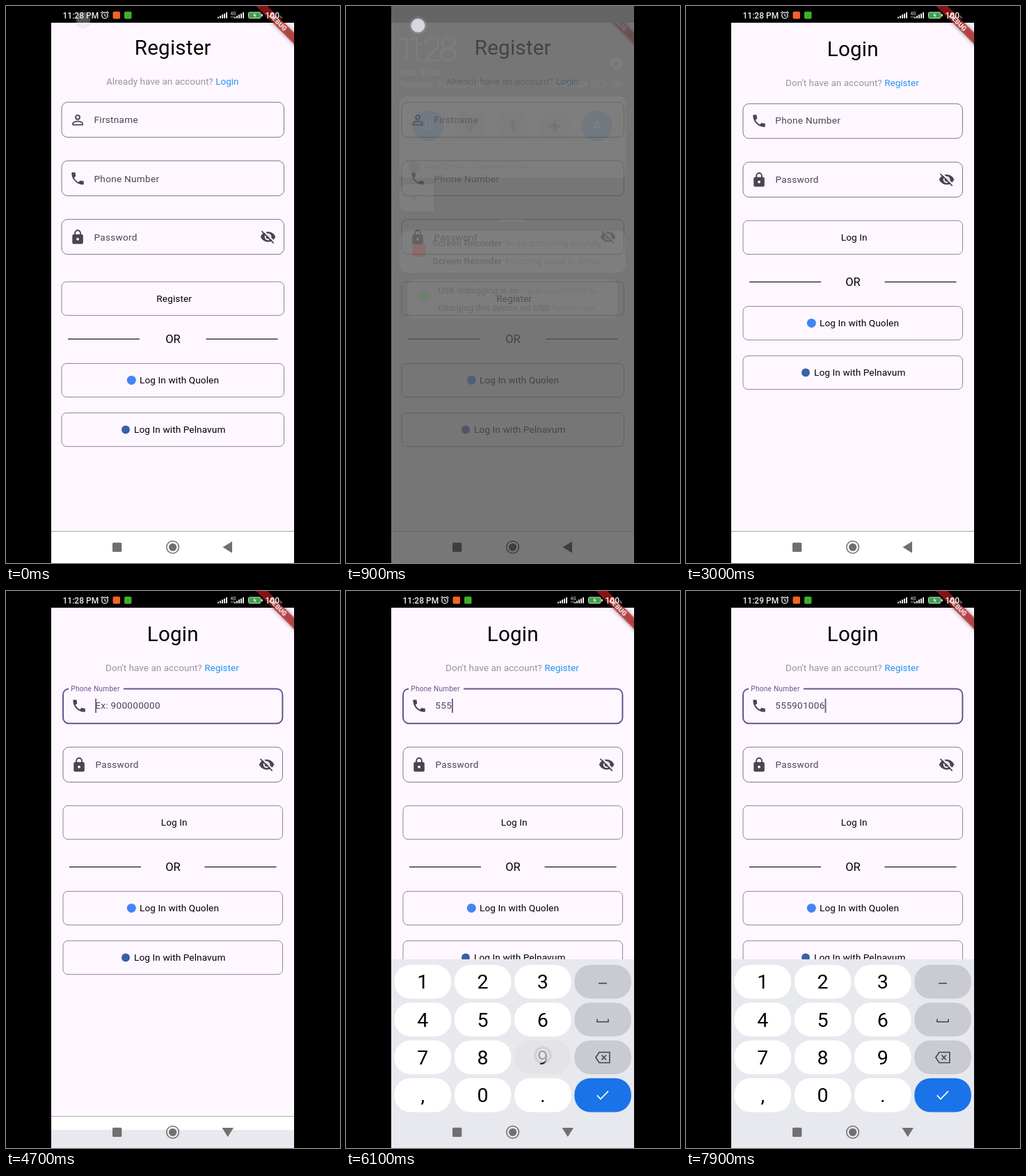
These frames come from a looping animation (480 px wide and 800 px high, 8000 ms). An HTML page:

```html
<!DOCTYPE html>
<html lang="en">
<head>
<meta charset="utf-8">
<title>Sign-in screens</title>
<style>
  html, body { margin: 0; height: 100%; overflow: hidden; background: #000; }
  svg { display: block; width: 100vw; height: 100vh; font-family: Roboto, sans-serif; }
</style>
</head>
<body>
<svg id="stage" viewBox="0 0 480 800"></svg>
<script>
const LOOP = 8000, STEP = 100;
const PAGE = '#fef7ff', INK = '#49454f', PURPLE = '#65558f';
const NUMBER = '555901006';
const PRESSES = [5300, 5500, 5800, 6100, 6400, 6900, 7200, 7500, 7700];
const HOLD = 200;

// ---------- drawing helpers ----------
const text = (x, y, size, body, more = '') =>
  `<text x="${x}" y="${y}" font-size="${size}" ${more}>${body}</text>`;
const mid = 'text-anchor="middle"';
const rect = (x, y, w, h, r, more) =>
  `<rect x="${x}" y="${y}" width="${w}" height="${h}" rx="${r}" ${more}/>`;
const circle = (x, y, r, more) => `<circle cx="${x}" cy="${y}" r="${r}" ${more}/>`;
const path = (d, more = '') => `<path d="${d}" ${more}/>`;
const line = (color, width) => `fill="none" stroke="${color}" stroke-width="${width}"`;
const group = (id, body, more = '') => `<g id="${id}" ${more}>${body}</g>`;

const ICONS = {
  person: path('M12 5.9a2.1 2.1 0 1 1 0 4.2a2.1 2.1 0 1 1 0-4.2m0 9c2.97 0 6.1 1.46 6.1 2.1v1.1H5.9V17c0-.64 3.13-2.1 6.1-2.1M12 4a4 4 0 1 0 0 8a4 4 0 1 0 0-8zm0 9c-2.67 0-8 1.34-8 4v3h16v-3c0-2.66-5.33-4-8-4z', 'fill-rule="evenodd"'),
  phone: path('M6.62 10.79c1.44 2.83 3.76 5.14 6.59 6.59l2.2-2.2c.27-.27.67-.36 1.02-.24 1.12.37 2.33.57 3.57.57.55 0 1 .45 1 1V20c0 .55-.45 1-1 1-9.39 0-17-7.61-17-17 0-.55.45-1 1-1h3.5c.55 0 1 .45 1 1 0 1.25.2 2.45.57 3.57.11.35.03.74-.25 1.02z'),
  lock: rect(4, 8, 16, 14, 2, '') + path('M8 9V6a4 4 0 0 1 8 0v3', line(INK, 2)) + circle(12, 15, 2, `fill="${PAGE}"`),
  eyeOff: path('M1 12C2.7 7.6 7 4.5 12 4.5S21.3 7.6 23 12C21.3 16.4 17 19.5 12 19.5S2.7 16.4 1 12Z')
    + circle(12, 12, 4, line(PAGE, 2))
    + path('M3.6 1.4L22.6 20.4', line(PAGE, 2)) + path('M2.6 3.6L20.4 21.4', line(INK, 1.8)),
};
const icon = (name, cx, cy) =>
  `<g transform="translate(${cx - 11.6} ${cy - 11.6}) scale(.97)" fill="${INK}">${ICONS[name]}</g>`;

const box = (x, y, h, r, more = line('#7d7882', 1)) => rect(x, y, 479.5 - 2 * x, h, r, more);
const label = (x, y, body, more = '') => text(x, y, 13.57, body, `fill="${INK}" letter-spacing=".3" ${more}`);
const field = (x, y, name, body) => box(x, y, 50.3, 8.5) + icon(name, x + 23, y + 25.5) + label(x + 46.5, y + 30.2, body);
const button = (x, y, body, tx = 241.7, more = mid) =>
  box(x, y, 48.3, 7, line('#8b878f', 1)) + text(tx, y + 29, 13.57, body, `letter-spacing=".12" ${more}`);
const title = (y, body) => text(239.8, y, 29.5, body, `${mid} letter-spacing=".25"`);
const prompt = (x, y, body, link) =>
  text(x, y, 13.57, `${body} <tspan fill="#2196f3">${link}</tspan>`, 'fill="#99959b"');

// Divider and the two partner buttons shared by both pages
const partners = (x, y) =>
  path(`M${x + 9} ${y}h103M${367.5 - x} ${y}h103`, line('#1d1b20', 1.2))
  + text(240, y + 5.8, 16.4, 'OR', mid)
  + button(x, y + 35, 'Log In with Quolen', 192, '') + circle(180.3, y + 59, 6.5, 'fill="#4285f4"')
  + button(x, y + 106, 'Log In with Pelnavum', 184, '') + circle(172, y + 130, 6, 'fill="#3b5fa5"');

const registerPage = title(69.5, 'Register')
  + prompt(144, 113.3, 'Already have an account?', 'Login')
  + field(80, 138.2, 'person', 'Firstname')
  + field(80, 222.3, 'phone', 'Phone Number')
  + field(80, 306.4, 'lock', 'Password') + icon('eyeOff', 376.5, 331.5)
  + button(80, 396.1, 'Register') + partners(80, 478.4);

const loginPage = title(71.5, 'Login')
  + prompt(143, 115.3, "Don't have an account?", 'Register')
  + `<rect id="phoneBox" x="82" y="140.4" width="315.4" height="49.8" rx="8.5" fill="none"/>`
  + rect(90, 138, 79, 5, 0, `id="gap" fill="${PAGE}"`)
  + icon('phone', 105, 165) + label(0, 0, 'Phone Number', 'id="phoneLabel"')
  + label(128.3, 169.4, '', 'id="entry"')
  + rect(128, 154.5, 1.8, 20.5, 0, `id="caret" fill="${PURPLE}"`)
  + field(82, 224.2, 'lock', 'Password') + icon('eyeOff', 374.5, 249.3)
  + button(82, 308.3, 'Log In') + partners(82, 396.4);

// ---------- status bar and navigation ----------
const alarm = (x, y) => `<g transform="translate(${x} ${y})">${circle(0, .5, 4.3, line('#eee', 1.3))
  + path('M0 -2V1L2 2M-5.5 -3L-2.8 -5.3M5.5 -3L2.8 -5.3', line('#eee', 1.2))}</g>`;
const bars = x => [0, 1, 2, 3, 4].map(i =>
  rect(x + 3 * i, 15.5 - 1.6 * i, 2, 2.2 + 1.6 * i, .6, 'fill="#eee"')).join('');
const radios = (dx, dy) => `<g transform="translate(${dx} ${dy})" fill="#eee">${bars(304) + bars(328)
  + text(322.5, 12.5, 6.5, '4G') + path('M324 14v3.5M326.5 14v3.5', line('#bbb', .8))
  + rect(348.5, 9, 17.5, 8.6, 2, 'fill="#35a541" stroke="#ddd"') + rect(367, 11.5, 1.8, 3.6, .6, '')
  + path('M358 9.8l-3 4h2.4l-.6 3 3.2-4h-2.5z')
  + text(372.5, 17.8, 12, '100', 'font-weight="500"') + text(392.8, 17.8, 6, '%')}</g>`;

const banner = `<g transform="translate(414 0) rotate(45)">${
  rect(-60, 27.1, 120, 11.6, 0, 'fill="#b71c1c" fill-opacity=".72" style="filter:drop-shadow(0 0 3px #0008)"')
  + text(0, 36.4, 9.8, 'DEBUG', `${mid} font-weight="900" fill="#fff" fill-opacity=".9"`)}</g>`;

const statusBar = rect(65, 0, 349, 24, 0, '') + banner
  + text(81.5, 18, 12, '', 'id="clock" fill="#eee" font-weight="500"') + alarm(142, 13)
  + rect(153.5, 8, 10.5, 10.5, 2, 'fill="#f4622a"') + rect(170, 8, 10.5, 10.5, 2, 'fill="#3fae2a"')
  + radios(0, 0);

const navIcons = rect(153, 770.8, 13.3, 13.3, 1.5, '')
  + circle(239.6, 777.3, 8.8, 'fill="none" stroke="currentColor" stroke-width="1.5"') + circle(239.6, 777.3, 5.6, '')
  + path('', 'id="back"');

// ---------- notification shade ----------
const tileIcons = [
  path('M-3 6V-6l-2.5 3M3 -6V6l2.5 -3', line('#fff', 1.5)),
  path('M-8 -2A11 11 0 0 1 8 -2M-5.3 1A7.5 7.5 0 0 1 5.3 1M-2.6 3.8A4 4 0 0 1 2.6 3.8', line('#555', 1.7)) + circle(0, 5.6, 1.4, 'fill="#555"'),
  path('M-4 -4L4 4L0 7.5V-7.5L4 -4L-4 4', line('#555', 1.5)),
  path('M0 -8.5Q1.5 -8 1.5 -3L8 1.5V3.5L1.5 1.5V5L3.5 7V8L0 7L-3.5 8V7L-1.5 5V1.5L-8 3.5V1.5L-1.5 -3Q-1.5 -8 0 -8.5', 'fill="#4a4a4a"'),
  path('M-6 6.5L0 -7L6 6.5M-4 2.5H4', line('#fff', 1.5)),
];
const tiles = tileIcons.map((glyph, i) => {
  const on = i % 4 === 0;
  return `<g transform="translate(${118.3 + 60.6 * i} 178)">${circle(0, 0, 22.5, `fill="${on ? '#218fe9' : '#c3c3c3'}"`)}${glyph}</g>`;
}).join('');

const panel = text('72 87 102 111 134', 85, 48, '11:28', 'fill="#fff" stroke="#fff" stroke-width=".6" font-weight="100"')
  + circle(388.5, 88.5, 5.6, line('#eee', 2.6)) + circle(388.5, 88.5, 7.8, line('#eee', 2) + ' stroke-dasharray="3.06"')
  + `<g fill="#f2f2f2" font-weight="500">${text(77, 105.5, 12, 'Wed, 5 Feb') + text(77, 122.5, 12, 'Tornavel | Kestova QN')}</g>`
  + alarm(298, 118) + radios(4.8, 105)
  + rect(77, 136, 325.5, 117, 9, 'fill="#dedede"') + tiles
  + path('M89 220.5H390', line('#c6c6c6', 1))
  + circle(98, 237, 8.2, 'fill="#8b8b8b"') + text(98, 240.3, 9, '?', `${mid} fill="#ddd"`)
  + `<g fill="#757575">${text(111.5, 240.2, 8.5, 'Today: 236.5MB') + text(187.5, 240.2, 8.5, 'This month: 1.66GB')}</g>`
  + path('M126 262H86a9 9 0 0 0 -9 9v21a9 9 0 0 0 9 9H126z', 'fill="#e2e2e2"')
  + circle(97, 281.5, 3.5, 'fill="#999"') + circle(97, 281.5, 6.8, line('#999', 2) + ' stroke-dasharray="1.4 3.94"')
  + rect(222, 311.8, 35, 4.2, 2, 'fill="#bdbdbd"');

const card = (id, mark, rows) => group(id, rect(0, 0, 324, 60, 10, 'fill="#aaa"') + mark
  + rows.map(([head, note], i) => text(47, 22 + 26 * i, 13.5,
    `${head}<tspan dx="4" font-size="11.9" font-weight="400" fill="#666">${note}</tspan>`,
    'font-weight="500" fill="#333"')).join(''));
const cards = card('recorder', rect(18, 18, 19, 19, 4, 'fill="#d9463c"'),
    [['Screen Recorder', 'Swipe something carefully…'], ['Screen Recorder', 'Recording saved to device…']])
  + card('usb', circle(26, 26, 10.5, 'fill="#4caf3a"'),
    [['USB debugging is on', 'Tap to turn off USB de…'], ['Charging this device via USB', 'Tap for more…']]);

// ---------- keyboard ----------
const COLS = [69.5, 155.8, 242, 328.3], ROWS = [537, 591.2, 645.5, 699.8];
const KEYS = ['123', '456', '789', ',0.'];
const sideGlyphs = [
  path('M-6 2H6', line('#444', 1.6)),
  path('M-8 -1V3H8V-1', line('#444', 1.6)),
  path('M-10 0L-5 -7.5H10V7.5H-5ZM-1.5 -3.5L5 3.5M5 -3.5L-1.5 3.5', line('#444', 1.6)),
  path('M-8 0L-3 5.5L8 -6', line('#fff', 1.8)),
];
const keyCentre = key => {
  const row = KEYS.findIndex(keys => keys.includes(key));
  return [COLS[KEYS[row].indexOf(key)] + 40.8, ROWS[row] + 24.2];
};
const keys = ROWS.map((y, row) =>
  [...KEYS[row]].map((key, col) => rect(COLS[col], y, 81.6, 48.6, 23, `id="key${key}" fill="#fff"`)
    + text(COLS[col] + 40.8, y + 34.3, 28.5, key, mid)).join('')
  + rect(COLS[3], y, 81.6, 48.6, 23, `fill="${row < 3 ? '#cacbd2' : '#1a73e8'}"`)
  + `<g transform="translate(${COLS[3] + 40.6} ${y + 24.5})">${sideGlyphs[row]}</g>`).join('');

const stage = document.getElementById('stage');
stage.innerHTML = `<clipPath id="screen"><rect x="65" width="349" height="800"/></clipPath>
  <clipPath id="aboveNav"><rect x="65" width="349" height="754"/></clipPath>`
  + rect(0, 0, 480, 800, 0, '')
  + group('device', rect(65, 24, 349, 730, 0, `fill="${PAGE}"`) + rect(65, 754, 349, 46, 0, 'fill="#fff"')
    + path('M65 754.5H414', line('#aaa', 1))
    + group('register', registerPage) + group('login', loginPage)
    + rect(65, 0, 349, 280, 0, 'id="board" fill="#e7e9ee"')
    + `<g clip-path="url(#aboveNav)">${group('keys', keys)}</g>`
    + statusBar
    + rect(65, 0, 349, 800, 0, 'id="dim"') + rect(65, 0, 349, 24, 0, 'id="dimTop" fill="#646464"')
    + group('panel', panel) + cards
    + group('nav', navIcons, 'fill="currentColor"')
    + group('touch', circle(0, 0, 13, 'fill="#9a9ac0" fill-opacity=".28"')
      + circle(0, 0, 10, 'fill="#ececf2" fill-opacity=".82" stroke="#aaaab4" stroke-opacity=".6"')),
    'clip-path="url(#screen)"');

// ---------- motion ----------
const $ = id => document.getElementById(id);
const set = (id, values) => { for (const k in values) $(id).setAttribute(k, values[k]); };
const clamp = v => Math.max(0, Math.min(1, v));
const track = (rows, t) => {
  const i = rows.findIndex(row => row[0] > t);
  if (i === 0) return rows[0].slice(1);
  if (i < 0) return rows[rows.length - 1].slice(1);
  const a = rows[i - 1], b = rows[i], p = (t - a[0]) / (b[0] - a[0]);
  return a.slice(1).map((v, n) => v + (b[n + 1] - v) * p);
};

// time, then the values named beside each table
const DIM = [[0, 0, 0], [100, .35, 30], [200, .62, 60], [300, .85, 90], [500, .94, 103],   // alpha, grey
  [700, .94, 103], [800, .9, 96], [900, .8, 85], [1000, .35, 80], [1100, 0, 80]];
const PANEL = [[100, 0, -24], [200, .2, -16], [300, .6, -7], [500, 1, 0], [700, 1, 0],      // opacity, shift
  [800, .5, -3], [900, .07, -6], [1000, 0, -8]];
const RECORDER = [[300, 340, .9, 0], [500, 332, .932, .12], [600, 323, 1, 1], [700, 323, 1, 1],  // top, scale, opacity
  [800, 323, 1, .6], [900, 323, 1, .18], [1000, 323, 1, 0]];
const USB = [[300, 440, .93, 0], [500, 427, .96, 1], [600, 393, 1, 1], [700, 393, 1, 1],
  [800, 393, .97, .5], [900, 393, .93, .13], [1000, 393, .93, 0]];
const SWIPE = [[0, 111, 19, .4], [100, 112, 30, .9], [300, 116, 60, 1], [500, 118, 75, 1],   // x, y, opacity
  [600, 118, 75, 1], [700, 114, 60, 1], [900, 103.5, 28, 1], [1000, 103, 20, 0]];
const BOARD = [[4600, 800], [4700, 774], [4800, 640], [4900, 555], [5000, 529]];             // top

const TAPS = [[2300, 318, 109], [4400, 240, 165], ...PRESSES.map((at, i) => [at, ...keyCentre(NUMBER[i])])];

function placeCard(id, rows, t) {
  const [top, scale, opacity] = track(rows, t);
  set(id, { transform: `translate(${239.3 - 162 * scale} ${top}) scale(${scale})`, opacity });
}

function draw(t) {
  const [alpha, grey] = track(DIM, t);
  set('dim', { fill: `rgb(${grey},${grey},${grey})`, opacity: alpha });
  set('dimTop', { opacity: Math.min(1, alpha * 1.25) });
  const [shown, shift] = track(PANEL, t);
  set('panel', { opacity: shown, transform: `translate(0 ${shift})` });
  placeCard('recorder', RECORDER, t);
  placeCard('usb', USB, t);

  const swap = clamp((t - 2400) / 400);
  set('register', { opacity: 1 - swap });
  set('login', { opacity: swap });

  const focused = t >= 4500, lift = clamp((t - 4450) / 200);
  set('phoneBox', { stroke: focused ? PURPLE : '#7d7882', 'stroke-width': focused ? 2 : 1 });
  set('gap', { opacity: lift });
  set('phoneLabel', {
    transform: `translate(${128.3 - 35 * lift} ${169.4 - 25.4 * lift}) scale(${1 - .25 * lift})`,
    fill: focused ? PURPLE : INK,
  });
  const count = PRESSES.filter(at => t >= at + HOLD).length;
  $('entry').textContent = count ? NUMBER.slice(0, count) : 'Ex: 900000000';
  set('entry', { opacity: count ? 1 : clamp((t - 4550) / 150) });
  set('caret', { x: 128.2 + 7.93 * count, opacity: focused ? 1 : 0 });

  const [top] = track(BOARD, t);
  set('board', { y: top });
  set('keys', { transform: `translate(0 ${top - 529})` });
  const held = PRESSES.findIndex(at => t >= at && t < at + HOLD);
  for (const key of '0123456789') set('key' + key, { fill: NUMBER[held] === key ? '#e4e4e6' : '#fff' });

  const shade = Math.round(112 - 62 * alpha);
  set('nav', { color: `rgb(${shade},${shade},${shade})` });
  set('back', { d: t >= 4650 ? 'M310.5 771H327L318.7 784Z' : 'M311.5 777.3L325 769V785.6Z' });
  $('clock').textContent = t < 6900 ? '11:28 PM' : '11:29 PM';

  const tap = TAPS.find(([at]) => t >= at && t < at + HOLD);
  const [x, y, opacity] = tap ? [tap[1], tap[2] - 3, .8] : track(SWIPE, t);
  set('touch', { transform: `translate(${x} ${y})`, opacity });
}

const start = performance.now();
function tick() {
  const t = (performance.now() - start) % LOOP;
  draw(Math.floor(t / STEP) * STEP);
  requestAnimationFrame(tick);
}
tick();
</script>
</body>
</html>
```
